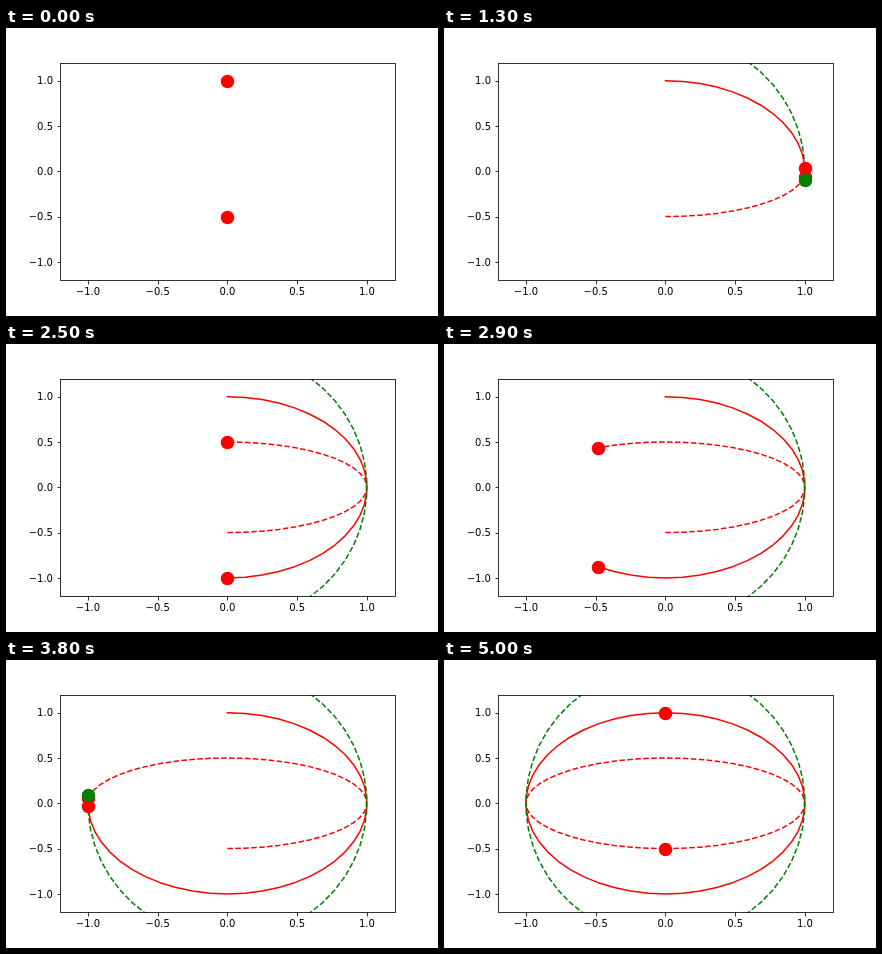
An HTML page for the animation above (5.1 s loop, 432 px wide and 288 px high).

```html
<!DOCTYPE html>
<html lang="en">
<head>
<meta charset="utf-8">
<title>Three orbits</title>
<style>
  html, body { margin: 0; width: 432px; height: 288px; overflow: hidden; background: #fff; }
  svg { display: block; }
  text { font: 10px "DejaVu Sans", sans-serif; }
  .axis { fill: none; stroke: #000; stroke-width: .8; }
  .trace { fill: none; stroke-width: 1.5; stroke-linejoin: round; }
  .solid { stroke-linecap: square; }
  .dashed { stroke-dasharray: 5.55 2.4; }
</style>
</head>
<body>
<svg width="432" height="288" viewBox="0 0 432 288">
  <clipPath id="box"><rect x="54" y="35" width="336" height="218"/></clipPath>
  <g id="plot" clip-path="url(#box)"></g>
  <g id="axes"><rect class="axis" x="54.5" y="35.5" width="335" height="217"/></g>
</svg>
<script>
const STEPS = 50, STEP_MS = 100;
const px = x => 221.4 + 139.5 * x;
const py = y => 143.28 - 90.6 * y;
const snap = v => Math.floor(v + .5) + .5;

function add(parent, tag, attrs, text = '') {
  const el = document.createElementNS('http://www.w3.org/2000/svg', tag);
  for (const name in attrs) el.setAttribute(name, attrs[name]);
  el.textContent = text;
  return parent.appendChild(el);
}

const axes = document.getElementById('axes');
for (const v of [-1, -.5, 0, .5, 1]) {
  const label = v.toFixed(1).replace('-', '\u2212');
  const x = snap(px(v)), y = snap(py(v));
  add(axes, 'path', { class: 'axis', d: `M${x} 252.5v4M54.5 ${y}h-3` });
  add(axes, 'text', { x: px(v), y: 267, 'text-anchor': 'middle' }, label);
  add(axes, 'text', { x: 47, y: Math.round(py(v) + 3.8), 'text-anchor': 'end' }, label);
}

const plot = document.getElementById('plot');
const orbits = [
  { height: 1, color: '#f00', style: 'solid' },
  { height: -.5, color: '#f00', style: 'dashed' },
  { height: 1.5, color: '#008000', style: 'dashed' }
];
for (const o of orbits) {
  o.trace = add(plot, 'path', { class: 'trace ' + o.style, stroke: o.color });
}
for (const o of orbits) o.dot = add(plot, 'circle', { r: 6.8, fill: o.color });

function point(height, i) {
  const a = 2 * Math.PI * i / STEPS;
  return [px(Math.sin(a)), py(height * Math.cos(a))];
}

function draw(step) {
  for (const { height, trace, dot } of orbits) {
    const points = Array.from({ length: step + 1 }, (_, i) => point(height, i));
    const [x, y] = points[step];
    trace.setAttribute('d', step ? 'M' + points.map(p => p.join(' ')).join('L') : '');
    dot.setAttribute('cx', snap(x));
    dot.setAttribute('cy', snap(y));
  }
}

const start = performance.now();
let shown = -1;
function tick() {
  const step = Math.floor((performance.now() - start) / STEP_MS) % (STEPS + 1);
  if (step !== shown) draw(shown = step);
  requestAnimationFrame(tick);
}
tick();
</script>
</body>
</html>
```
